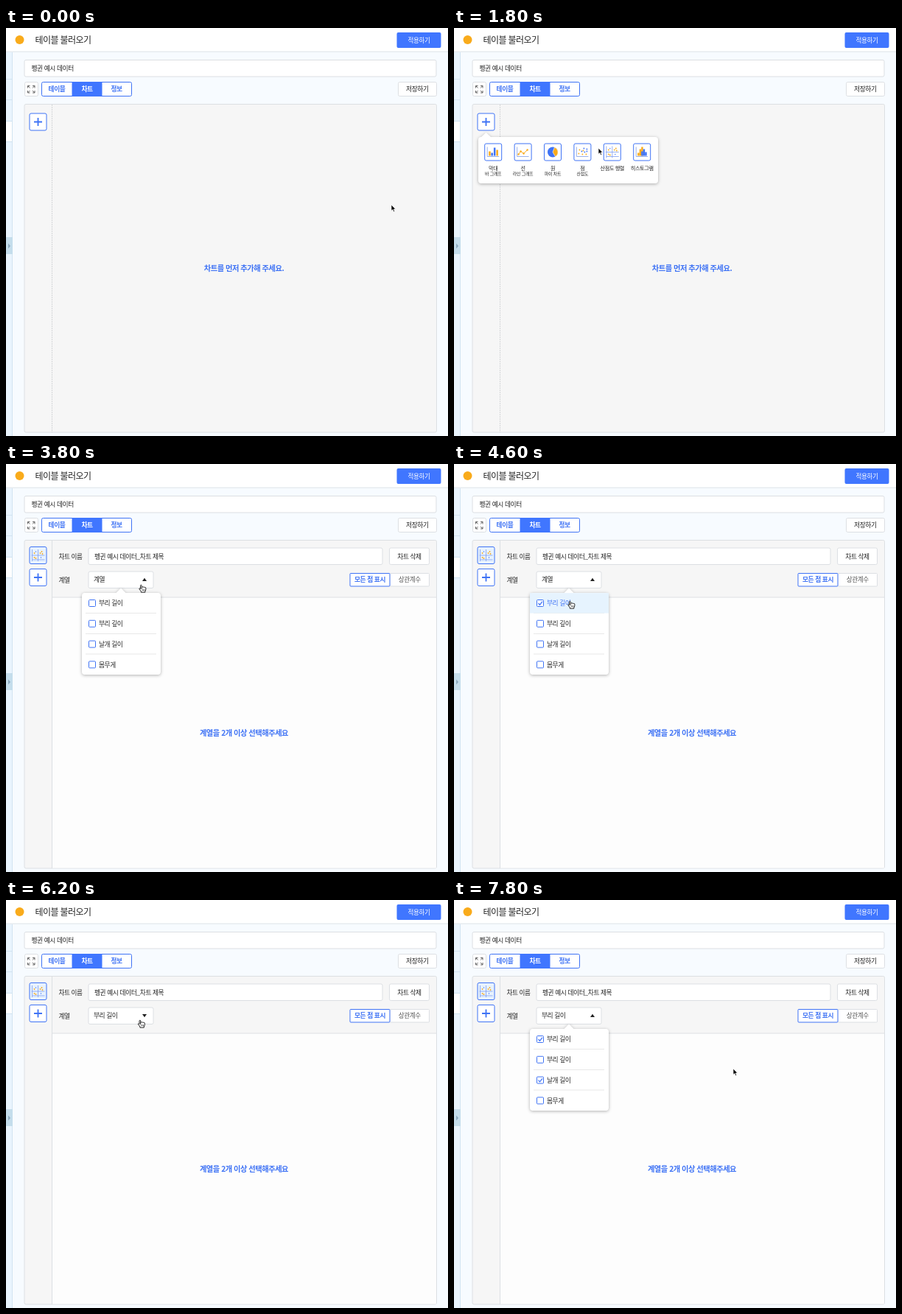
These frames come from a looping animation (600 by 554 pixels, 8000 ms). An HTML page:

```html
<!DOCTYPE html>
<html lang="ko">
<head>
<meta charset="utf-8">
<style>
html, body { margin: 0; width: 100%; height: 100%; overflow: hidden; background: #f7fbff; }
svg { display: block; width: 600px; height: 554px; }
text { font-family: "Noto Sans CJK KR", "Noto Sans CJK", sans-serif; letter-spacing: -.05em; white-space: pre; }
.popup { filter: drop-shadow(0 1px 2px rgba(0, 0, 0, .3)); }
</style>
</head>
<body>
<svg id="stage" viewBox="0 0 600 554"></svg>
<script>
const BLUE = '#3f73f5', ORANGE = '#f9ab1b', INK = '#222', EDGE = '#dcdfe3';
const LOOP = 8000, TICK = 200;
const ROWS = ['부리 길이', '부리 깊이', '날개 길이', '몸무게'];
const rowY = i => 189 + i * 27.8;

const rect = (x, y, w, h, fill, stroke = 'none', r = 0) =>
  `<rect x="${x}" y="${y}" width="${w}" height="${h}" rx="${r}" fill="${fill}" stroke="${stroke}"/>`;
const path = (d, stroke, width = 1, fill = 'none', extra = '') =>
  `<path d="${d}" stroke="${stroke}" stroke-width="${width}" fill="${fill}" ${extra}/>`;
const text = (x, middle, str, { size = 8.75, fill = INK, weight = 500, anchor = 'start', id = '' } = {}) =>
  `<text ${id && `id="${id}"`} x="${x}" y="${middle + size * .36}" font-size="${size}" fill="${fill}"
    font-weight="${weight}" text-anchor="${anchor}">${str}</text>`;
const centered = (x, y, str, style) => text(x, y, str, { anchor: 'middle', ...style });
const group = (id, body, attrs = '') => `<g id="${id}" ${attrs}>${body}</g>`;
const at = (x, y, body) => `<g transform="translate(${x} ${y})">${body}</g>`;
const dots = (points, fill, r = .9) =>
  points.map(([x, y]) => `<circle cx="${x}" cy="${y}" r="${r}" fill="${fill}"/>`).join('');
const bars = (list, base, w) =>
  list.map(([x, h, fill]) => rect(x, base - h, w, h, fill)).join('');

// Chart icons, drawn around their own centre
const tile = rect(-11.5, -11.5, 23, 23, '#fff', BLUE, 2);
const axes = path('M-8 -7V6H8', '#8fa9e8', .9);
const icons = {
  bar: axes + bars([[-6, 6, ORANGE], [-2.8, 4, BLUE], [.7, 11, BLUE], [4.2, 8, ORANGE]], 5, 2.5),
  line: axes + path('M-6 3L-3 -1L1 2L6 -3', ORANGE, 1) + dots([[-6, 3], [-3, -1], [1, 2], [6, -3]], ORANGE, 1.2),
  pie: `<circle r="7" fill="${BLUE}"/>` + path('M0 0L2.5 -6.6A7 7 0 0 1 3.5 6.1Z', '#fff', .6, ORANGE),
  scatter: axes + dots([[-5, 2], [-4, -3], [0, 3], [1, -2], [5, 3]], ORANGE) +
    dots([[-1, -1], [2, -5], [3, 0], [6, -4], [6, -1]], BLUE),
  matrix: path('M-8 -8V8M-8 6H9M0 -8V8M-9 0H9', '#7f9df0', .8) +
    dots([[-5, 3], [-3, 4], [-5, -3], [3, -3], [5, -5], [6, -2]], ORANGE) + dots([[4, 3], [-3, -5]], BLUE, .7),
  histogram: axes + bars([[-6, 4, ORANGE], [-3.5, 9, ORANGE], [-1, 12, ORANGE], [1.5, 9, BLUE], [4, 5, BLUE], [-1, 6, BLUE]], 5, 2.5)
};
const chartTypes = [
  ['bar', '막대', '바 그래프'], ['line', '선', '라인 그래프'], ['pie', '원', '파이 차트'],
  ['scatter', '점', '산점도'], ['matrix', '산점도 행렬', ''], ['histogram', '히스토그램', '']
];

const sidebar = rect(0, 32, 9, 522, '#e9f4fd') + rect(0, 126, 9, 28, '#fff') +
  path('M0 69.5H9M0 97.5H9M0 126.5H9M0 154.5H9M8.5 32V554', '#d2e4f1') +
  rect(0, 284, 9, 23, '#c4ddec') + path('M3 292.5L6 296L3 299.5Z', 'none', 0, '#8aa9bf');

const header = rect(0, 31, 600, 2, '#e6ebf0') + rect(0, 0, 600, 31.5, '#fff') +
  `<circle cx="18.5" cy="16" r="6" fill="${ORANGE}"/>` +
  text(39.5, 16.3, '테이블 불러오기', { size: 12 }) +
  rect(530.5, 6, 60, 21, '#4076ff', 'none', 2) + centered(560.5, 16.5, '적용하기', { size: 8.6, fill: '#fff', weight: 400 });

const toolbar = rect(25, 43.5, 559, 22.5, '#fff', EDGE, 2) + text(34.5, 54.5, '펭귄 예시 데이터') +
  rect(25.5, 73.5, 18, 19, '#fff', EDGE, 2) +
  path('M32.5 81.5L29.5 78.5M29.5 81.5V78.5H32.5M36 81.5L39 78.5M36 78.5H39V81.5M32.5 85L29.5 88M29.5 85V88H32.5M36 85L39 88M39 85V88H36', '#555', .9) +
  rect(48.5, 73.5, 122, 19, '#fff', BLUE, 2) + rect(89.5, 73, 41, 20, '#4076ff') +
  centered(69, 83, '테이블', { fill: BLUE, weight: 700 }) + centered(110, 83, '차트', { fill: '#fff', weight: 700 }) +
  centered(150, 83, '정보', { fill: BLUE, weight: 700 }) +
  rect(532.5, 73.5, 52, 19, '#fff', EDGE, 2) + centered(558.3, 83.2, '저장하기', { weight: 400 });

const panel = rect(25, 103.5, 559.5, 445.5, '#f6f6f6', EDGE, 2);

const emptyView = path('M62.5 104V549', '#d3d5d8', 1, 'none', 'stroke-dasharray="2 1"') +
  centered(323, 326, '차트를 먼저 추가해 주세요.', { size: 10.3, fill: BLUE, weight: 700 });

const chartView = rect(62.5, 181, 521.5, 367.5, '#fdfdfd') + path('M62.5 104V549M62.5 181H584', EDGE) +
  at(43.5, 124, rect(-11.5, -11.5, 23, 23, '#e7f2fe', BLUE, 2) + icons.matrix) +
  text(71.5, 126, '차트 이름', { size: 8.6 }) + rect(112, 114, 399, 22.5, '#fff', EDGE, 2) +
  text(120, 125.5, '펭귄 예시 데이터_차트 제목') +
  rect(520.5, 114, 54, 22.5, '#fff', EDGE, 2) + centered(547.5, 125.8, '차트 삭제') +
  text(71.5, 157.5, '계열') + rect(112, 146, 88, 22.5, '#fff', EDGE, 2) +
  text(119, 157, '계열', { id: 'seriesLabel' }) +
  `<path id="caret" d="M-3 2L0 -2.2L3 2Z" fill="${INK}"/>` +
  rect(521, 148.5, 53.5, 17.5, '#fff', EDGE, 1) + rect(467, 148.5, 54, 17.5, '#fff', BLUE, 1) +
  centered(494, 157.3, '모든 점 표시', { fill: BLUE, weight: 700 }) + centered(547.8, 157.3, '상관계수', { size: 8.6, fill: '#555', weight: 400 }) +
  centered(323, 365, '계열을 2개 이상 선택해주세요', { size: 10.3, fill: BLUE, weight: 700 });

const addButton = tile + path('M-5.5 0H5.5M0 -5.5V5.5', BLUE, 1.8);

const typeMenu = path('M37 148L43.5 142L50 148H273A4 4 0 0 1 277 152V207A4 4 0 0 1 273 211H37A4 4 0 0 1 33 207V152A4 4 0 0 1 37 148Z', 'none', 0, '#fff', 'class="popup"') +
  chartTypes.map(([icon, name, note], i) => {
    const x = 53.2 + i * 40.4;
    return at(x, 168.5, tile + icons[icon]) +
      centered(x, 190, name, { size: 7.1 }) + centered(x, 198.3, note, { size: 6 });
  }).join('');

const seriesMenu = path('M107 175H149.5L156 168.5L162.5 175H206A4 4 0 0 1 210 179V282A4 4 0 0 1 206 286H107A4 4 0 0 1 103 282V179A4 4 0 0 1 107 175Z', 'none', 0, '#fff', 'class="popup"') +
  path('M108 202.5H204M108 230.5H204M108 258H204', '#e8e8e8') +
  ROWS.map((name, i) => {
    const y = rowY(i);
    return group('hover' + i, rect(103, y - 13.8, 107, 27.4, '#e6f3fe')) +
      rect(112.5, y - 4.5, 9, 9, '#fff', BLUE, 1) +
      group('check' + i, path(`M114.5 ${y}L116.5 ${y + 2.2}L120 ${y - 2.3}`, BLUE, 1.2)) +
      text(126, y + .2, name, { id: 'row' + i });
  }).join('');

const arrow = path('M0 0V8.2L1.9 6.5L3.2 9.5L4.6 8.9L3.3 6H5.8Z', '#fff', .7, '#000');
const hand = path('M3.2 6V1.2Q3.2 .3 2.4 .3Q1.5 .3 1.5 1.3V5.6L.9 5Q-.1 4.5 -.2 5.5L2.4 9V10.2H7.8V9L8.8 6.8V4.2Q8.7 3.2 7.6 3.6Q7 2.9 5.9 3.2Q5 2.6 3.2 3',
  '#111', .9, '#fff', 'stroke-linejoin="round"') + path('M4.2 6.2V8.4M5.7 6.2V8.4M7.1 6.2V8.4', '#111', .6);

document.getElementById('stage').innerHTML =
  rect(0, 0, 600, 554, '#f7fbff') + sidebar + header + toolbar + panel +
  group('emptyView', emptyView) + group('chartView', chartView) + group('addButton', addButton) +
  group('typeMenu', typeMenu) + group('seriesMenu', seriesMenu) +
  group('cursor', group('arrow', arrow) + group('hand', hand));

// Pointer stops: time, x, y
const stops = [
  [0, 523, 240], [1000, 43, 128], [1400, 43, 128], [1800, 196, 163], [2200, 214, 168], [2600, 214, 168],
  [3400, 181, 160], [3800, 181, 164], [4200, 155, 186], [4600, 155, 186], [5000, 253, 165], [5600, 253, 165],
  [6200, 179.5, 163], [6400, 179.5, 163], [6800, 172.3, 242], [7000, 172.3, 242], [7600, 379, 229], [8000, 379, 229]
];
function pointerAt(t) {
  const i = stops.findIndex(s => s[0] > t);
  const [t0, x0, y0] = stops[i - 1], [t1, x1, y1] = stops[i];
  const u = (t - t0) / (t1 - t0), k = u * u * (3 - 2 * u);
  return [x0 + (x1 - x0) * k, y0 + (y1 - y0) * k];
}

const el = id => document.getElementById(id);
const show = (id, on) => { el(id).style.display = on ? '' : 'none'; };
const move = (id, x, y, more = '') => el(id).setAttribute('transform', `translate(${x} ${y})${more}`);

function draw(now) {
  const t = Math.floor(now % LOOP / TICK) * TICK;
  const [x, y] = pointerAt(t);
  const inside = (left, top, right, bottom) => x >= left && x <= right && y >= top && y <= bottom;
  const hasChart = t >= 2600;
  const picking = t >= 1200 && !hasChart;
  const open = t >= 3600 && t < 5600 || t >= 6400;
  const checked = [t >= 4200, false, t >= 7000, false];

  show('emptyView', !hasChart);
  show('chartView', hasChart);
  move('addButton', 43.5, hasChart ? 154 : 127.5);
  show('typeMenu', picking);
  show('seriesMenu', open);
  el('seriesLabel').textContent = t >= 5600 ? ROWS[0] : '계열';
  move('caret', 188, 157, open ? '' : ' scale(1 -1)');

  ROWS.forEach((_, i) => {
    const hovered = open && inside(103, rowY(i) - 13.8, 210, rowY(i) + 13.8);
    show('hover' + i, hovered);
    show('check' + i, checked[i]);
    el('row' + i).setAttribute('fill', hovered ? BLUE : INK);
  });

  const clickable = hasChart
    ? inside(112, 146, 200, 168) || open && inside(103, 175, 210, 286)
    : inside(32, 116, 55, 139) || picking && inside(203, 157, 227, 180);
  show('hand', clickable);
  show('arrow', !clickable);
  move('cursor', x, y);
}

function loop() {
  draw(performance.now());
  requestAnimationFrame(loop);
}
loop();
</script>
</body>
</html>
```
